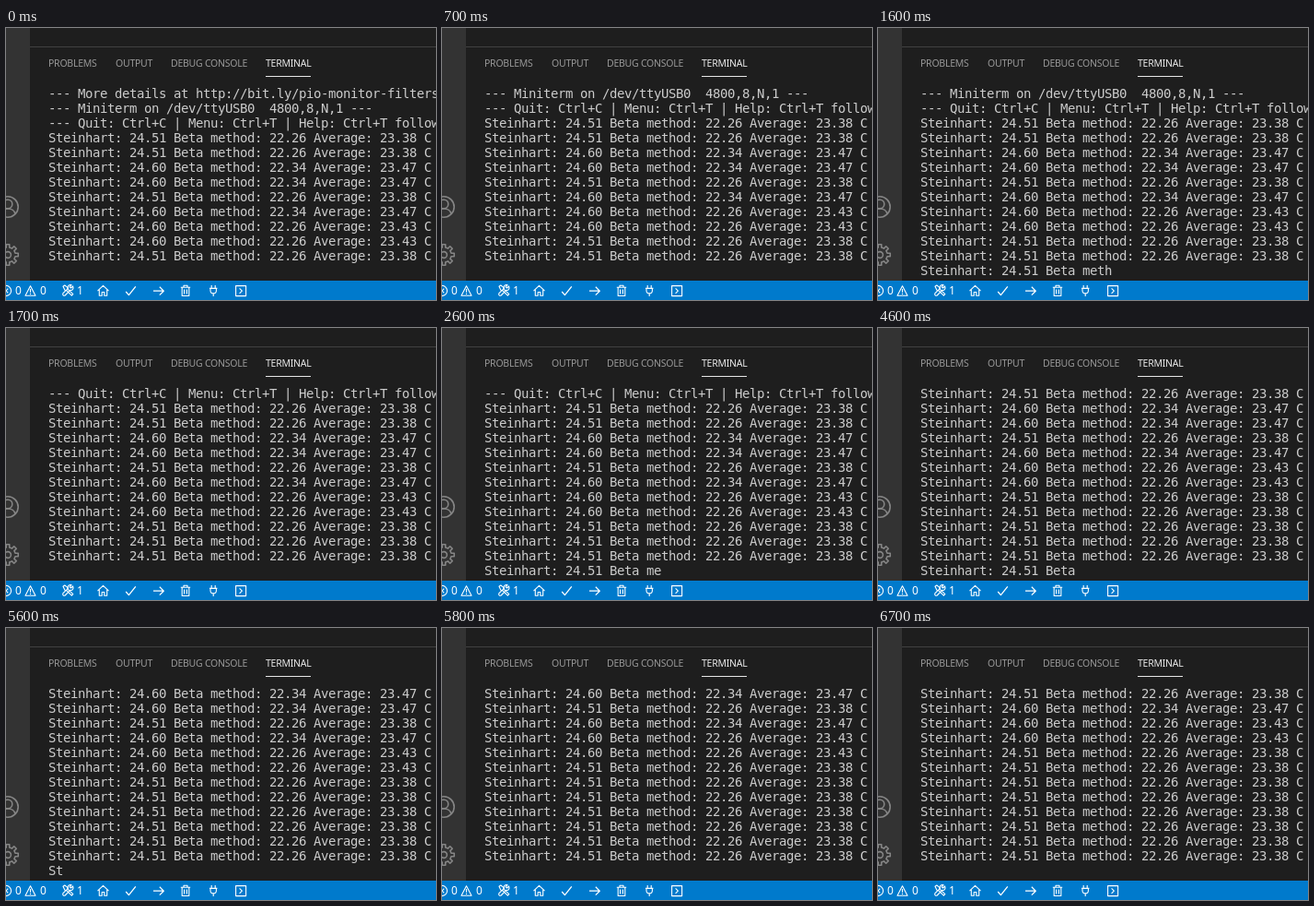
Animation of 467 by 295 pixels, one loop 7500 ms. Source, as an HTML page:

```html
<!DOCTYPE html>
<html lang="en">
<head>
<meta charset="utf-8">
<title>Serial monitor</title>
<style>
html, body { margin: 0; width: 100%; height: 100%; overflow: hidden; background: #1e1e1e; }
body { position: relative; font-family: "Noto Sans", "Open Sans", sans-serif; }
.side { position: absolute; left: 0; top: 0; width: 26px; height: 274px; background: #333; }
.edge { position: absolute; left: 26px; right: 0; top: 20px; height: 1px; background: #414141; }
.tab {
  position: absolute; top: 30px; height: 22px; line-height: 16px; white-space: pre;
  font-size: 10.5px; letter-spacing: -.25px; color: #979797;
}
.tab.on { color: #e7e7e7; width: 49px; border-bottom: 1px solid #e7e7e7; }
#term {
  position: absolute; left: 46px; top: 63px; right: 0; height: 208px; margin: 0; overflow: hidden;
  font: 14px/16px "DejaVu Sans Mono", monospace; letter-spacing: calc(8px - 1ch);
  font-variant-ligatures: none; color: #ccc;
}
.status { position: absolute; left: 0; right: 0; top: 274px; bottom: 0; background: #007acc; }
.num { position: absolute; top: 274px; line-height: 22px; font-size: 12px; color: #fff; }
svg { position: absolute; left: 0; top: 0; }
svg g { fill: none; stroke-linejoin: round; }
</style>
</head>
<body>
<div class="side"></div>
<div class="edge"></div>
<div class="tab" style="left:46px">PROBLEMS</div>
<div class="tab" style="left:119px">OUTPUT</div>
<div class="tab" style="left:179px">DEBUG CONSOLE</div>
<div class="tab on" style="left:282px">TERMINAL</div>
<pre id="term"></pre>
<div class="status"></div>
<span class="num" style="left:10px">0</span>
<span class="num" style="left:37px">0</span>
<span class="num" style="left:77px">1</span>
<svg width="467" height="295" viewBox="0 0 467 295">
  <g stroke="#858585" stroke-width="1.6">
    <circle cx="2" cy="194" r="11.2"/>
    <circle cx="2" cy="191" r="4.8"/>
    <path d="M-6 202C-5 194 9 194 10 202"/>
    <path id="gear"/>
    <circle cx="2" cy="246" r="3.4"/>
  </g>
  <g stroke="#fff" stroke-width="1.1">
    <path d="M-2.3 282.7l4.6 4.6M2.3 282.7l-4.6 4.6"/>
    <circle cx="0" cy="285" r="5.6"/>
    <path d="M26.5 279.7L32 290.3H21zM26.5 283v3.8M26.5 287.8v1.3"/>
    <path d="M62 280.2l1.8-1.2 3 2.4.2 1.8 5.8 5.4-1.5 1.6-5.6-5.6-1.8-.4z"/>
    <path d="M72.6 280l-2 2-1.4-1.2 1.8-2.2c-2.6-.5-4.4 1.4-3.6 3.8l-5.6 5.4c-.6 1.8.8 3 2.4 2.2l5.4-5.6c2.6.6 4.2-1.6 3-4.4z"/>
    <path d="M99.5 285.2l6-5.8 6 5.8M101.3 284v6.3h2.9v-3.8h2.6v3.8h2.9V284"/>
    <path d="M130.2 286l3.2 3.6 7.4-9.2" stroke-width="1.3"/>
    <path d="M160 285.2h11M166.8 280.8l4.5 4.4-4.5 4.4" stroke-width="1.2"/>
    <path d="M189.8 281.3h10.4M193 281v-1.8h4v1.8M191.2 281.5v9h7.6v-9M193.6 283.5v5M196.4 283.5v5"/>
    <path d="M223.2 279v3M227.2 279v3M221 282.4h8.4M222 282.5v2.2c0 4.2 6.4 4.2 6.4 0v-2.2M225.2 288v3"/>
    <path d="M249.6 279.6h11v11h-11zM253.6 282.4l2.8 2.7-2.8 2.7"/>
  </g>
</svg>
<script>
const LOOP = 7500, ROWS = 12;

const kinds = {
  a: ["24.51", "22.26", "23.38"],
  b: ["24.60", "22.34", "23.47"],
  c: ["24.60", "22.26", "23.43"]
};
const reading = k => {
  const [s, b, avg] = kinds[k];
  return `Steinhart: ${s} Beta method: ${b} Average: ${avg} C`;
};
const log = [
  "--- More details at http://bit.ly/pio-monitor-filters",
  "--- Miniterm on /dev/ttyUSB0  4800,8,N,1 ---",
  "--- Quit: Ctrl+C | Menu: Ctrl+T | Help: Ctrl+T followed by Ctrl+H ---",
  ..."aabbabccaaaaaaaa"
].map(s => s.length === 1 ? reading(s) : s);

// [start ms, first visible line, characters received of the next line]
const steps = [
  [0, 0, 0],
  [600, 0, 27], [700, 1, 0],
  [1600, 1, 26], [1700, 2, 0],
  [2600, 2, 24], [2700, 3, 0],
  [3600, 3, 23], [3700, 4, 0],
  [4600, 4, 21], [4700, 5, 0],
  [5600, 5, 2], [5700, 5, 50], [5800, 6, 0],
  [6600, 6, 20], [6700, 7, 0]
];

// Eight-toothed cog around (2, 246)
const cog = [];
for (let i = 0; i < 8; i++) {
  for (const [turn, r] of [[-.27, 8.2], [-.2, 11.4], [.2, 11.4], [.27, 8.2]]) {
    const a = (i + turn) * Math.PI / 4;
    cog.push((2 + r * Math.sin(a)).toFixed(2) + " " + (246 - r * Math.cos(a)).toFixed(2));
  }
}
document.getElementById("gear").setAttribute("d", "M" + cog.join("L") + "Z");

const term = document.getElementById("term");
let shown = null;
function draw(now) {
  const t = now % LOOP;
  const step = steps.findLast(s => s[0] <= t);
  if (step !== shown) {
    const [, top, chars] = shown = step;
    const next = (log[top + ROWS] || "").slice(0, chars);
    term.textContent = [...log.slice(top, top + ROWS), next].join("\n");
  }
}
const start = performance.now();
function tick() {
  draw(performance.now() - start);
  requestAnimationFrame(tick);
}
tick();
</script>
</body>
</html>
```
